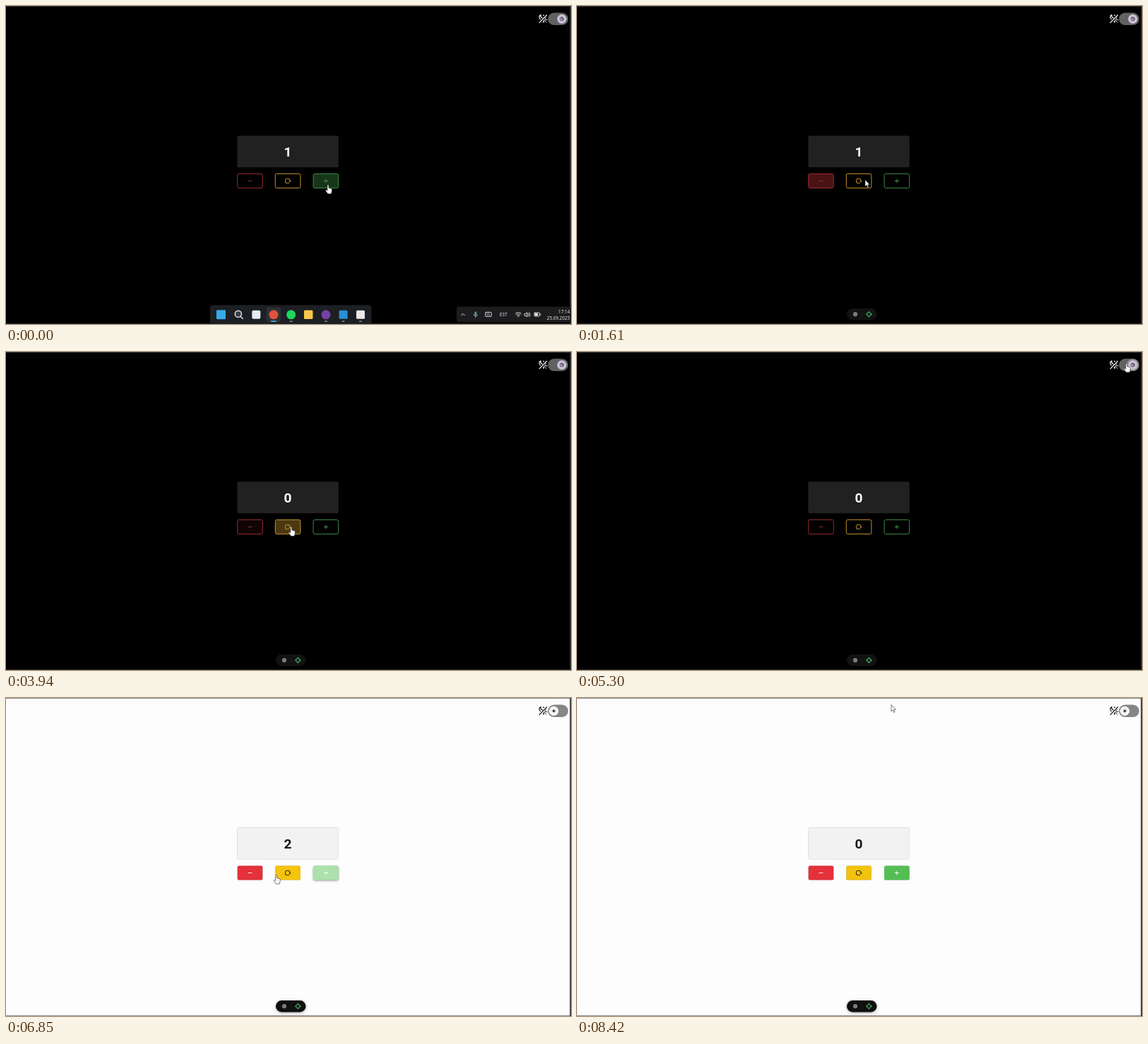
These frames come from a looping animation (800 by 450 pixels, 8.45 s). An HTML page:

```html
<!DOCTYPE html>
<html lang="en">
<head>
<meta charset="utf-8">
<title>Counter</title>
<style>
  html, body { margin: 0; width: 100%; height: 100%; overflow: hidden; background: #000; }
  svg { display: block; width: 800px; height: 450px; }
  #stage {
    --bg: #000; --card: #212121; --ink: #fff; --track: #616161; --thumb: #cdbfda;
    --top: #363636; --side: #303030; --base: #242424; --pill: #121212;
  }
  #stage.light {
    --bg: #fdfdfd; --card: #f2f2f2; --ink: #151515; --track: #868686; --thumb: #fff;
    --top: #8a8a8a; --side: #2b2b2b; --base: #8a8a8a; --pill: #0f0f0f;
  }
  .light #card { filter: drop-shadow(0 .8px .7px rgba(0,0,0,.4)); }
  .light #pill { filter: drop-shadow(0 1px 2px rgba(0,0,0,.35)); }
  #count { font: 700 19.1px Roboto, sans-serif; text-anchor: middle; fill: var(--ink); }
  .tray { font: 6.4px "Open Sans", "Noto Sans", sans-serif; fill: #f2f2f2; }
  .line { fill: none; stroke-linecap: round; stroke-linejoin: round; }
  .face { fill: none; stroke: var(--tint); stroke-width: .9; }
  .icon { fill: var(--tint); }
  .over { fill: var(--tint); }
  .light .face { fill: var(--solid); stroke: none; }
  .light .icon { fill: var(--on); }
  .light .over { fill: var(--on); }
  .sun { display: none; }
  .light .sun { display: inline; }
  .light .moon { display: none; }
</style>
</head>
<body>
<svg id="stage" viewBox="0 0 800 450">
  <rect width="800" height="450" fill="var(--bg)"/>
  <rect width="800" height="1" fill="var(--top)"/>
  <rect y="449" width="800" height="1" fill="var(--base)"/>
  <rect x="798.4" width="1.6" height="450" fill="var(--side)"/>

  <rect id="card" x="327.4" y="183.5" width="143.4" height="44.7" rx="2" fill="var(--card)"/>
  <text id="count" x="399" y="212.6">1</text>
  <g id="buttons"></g>

  <g class="line" stroke="var(--ink)" stroke-width="1.2">
    <path d="M765.6 13L755.2 23.6"/>
    <path d="M757.2 12.6C754.6 13.6 754.2 17 756.6 18.8M757.2 12.6C756.8 15 757.6 16.6 759.6 17M760.6 13.2h1.2"/>
    <path d="M760 22.6L763.6 19M761.4 23.4v-2.6M763.2 21.4l1.8 1.8M763.8 19.6h2.4M763 18l1.6-1.4" stroke-width="1"/>
  </g>
  <rect x="767.3" y="9.5" width="28.7" height="17.6" rx="8.8" fill="var(--track)"/>
  <g id="thumb">
    <circle id="halo" r="8.8" fill="#d9d9d9"/>
    <circle r="6.6" fill="var(--thumb)"/>
    <g class="moon line" stroke="#29222f" stroke-width=".8">
      <circle r="2.5"/><path d="M-1 -1.2L1.2 1.1M-.2 -1.8L1 -.8"/>
    </g>
    <g class="sun">
      <circle r="1.5" fill="#111"/>
      <circle r="2.6" fill="none" stroke="#111" stroke-width=".9" stroke-dasharray=".7 1.342"/>
    </g>
  </g>

  <g id="pill">
    <rect x="382" y="428" width="42.5" height="16.4" rx="8.2" fill="var(--pill)"/>
    <circle cx="394" cy="436.2" r="3.1" fill="#777c80"/>
    <path d="M403.6 432.5v7.4" stroke="#272727" stroke-width=".7"/>
    <g class="line" stroke="#4fcf72" stroke-width=".9">
      <circle cx="413.4" cy="436.2" r="2.9"/>
      <path d="M413.4 432.2v1.8M413.4 438.4v1.8M409.4 436.2h1.8M415.6 436.2h1.8"/>
    </g>
  </g>

  <g id="taskbar">
    <rect x="289" y="423.3" width="228.5" height="30" rx="4" fill="#1c1f23"/>
    <rect x="369" y="426.5" width="20" height="20.5" rx="2" fill="#2d3034"/>
    <g id="apps"></g>
    <g class="line" stroke="#e6e8ea" stroke-width="1.4">
      <circle cx="328.8" cy="435.8" r="4.6" fill="#3a4046"/><path d="M332.3 439.4l3 3.2"/>
    </g>
    <rect x="638" y="425.6" width="166" height="22" rx="4" fill="#1c1c1e"/>
    <g class="line" stroke="#f0f0f0" stroke-width=".9">
      <path d="M644.6 437.8l2.4-2.4 2.4 2.4"/>
      <path d="M662.4 436.4a2.5 2.5 0 0 0 5 0M664.9 439v1.6" stroke="#9fc7c4"/>
      <rect x="663.7" y="432.4" width="2.4" height="5" rx="1.2" fill="#4fb3ac" stroke="none"/>
      <rect x="678.8" y="433.4" width="8.6" height="6" rx="1"/>
      <path d="M680.6 435.4h5M681.2 437.4h3.8" stroke-width=".7" stroke-dasharray=".5 1.2"/>
      <path d="M721.4 435.2a5.8 5.8 0 0 1 8 0M722.8 437a3.8 3.8 0 0 1 5.2 0M724.2 438.6a1.8 1.8 0 0 1 2.4 0M725.4 440h.1"/>
      <path d="M734.4 435.4h1.4l2-1.8v6.4l-2-1.8h-1.4zM739.4 435.2a2.4 2.4 0 0 1 0 3.2M740.8 433.8a4.2 4.2 0 0 1 0 6"/>
      <rect x="748" y="434" width="7.6" height="5" rx="1"/>
      <path d="M749.4 435.2h3.4v2.6h-3.4z" fill="#f0f0f0"/><path d="M756.8 436v1"/>
    </g>
    <text class="tray" x="704.4" y="439" text-anchor="middle">EST</text>
    <text class="tray" x="798.4" y="434.8" text-anchor="end">17:14</text>
    <text class="tray" x="798.4" y="443.6" text-anchor="end">25.09.2025</text>
  </g>

  <g id="cursor" fill="#fff" stroke="#222" stroke-width=".6" stroke-linejoin="round">
    <path id="arrow" d="M0 0V9.4L2.1 7.4L3.6 10.9L5.1 10.2L3.6 6.9H6.5Z"/>
    <path id="hand" d="M-1 1a1 1 0 0 1 2 0V4.5l3.5.9c.9.2 1.2.9 1.1 1.7L5.1 10.6L4.5 12.8H-.4L-3.3 8.5c-.6-1 .6-1.9 1.4-1.1L-1 8.3Z"/>
  </g>
</svg>

<script>
const LOOP = 8450, THEME_AT = 5390, LAG = 70, RELEASE = 90;
const $ = id => document.getElementById(id);

function add(parent, tag, attrs) {
  const el = document.createElementNS('http://www.w3.org/2000/svg', tag);
  for (const k in attrs) el.setAttribute(k, attrs[k]);
  return parent.appendChild(el);
}
const clamp = v => Math.max(0, Math.min(1, v));
const smooth = p => p * p * (3 - 2 * p);

const buttons = {
  minus: { x: 345.5, tint: '#ad2f37', solid: '#e4313a', on: '#fff', icon: 'M19 13H5v-2h14z' },
  reset: { x: 399.1, tint: '#d9a334', solid: '#f5c40e', on: '#111',
    icon: 'M2 12a9 9 0 009 9c2.4 0 4.7-.9 6.4-2.6l-1.5-1.5A6.7 6.7 0 0111 19c-6.2 0-9.4-7.5-5-12S18 5.8 18 12h-3l4 4h.1l3.9-4h-3a9 9 0 00-18 0z' },
  plus: { x: 452.9, tint: '#459a4a', solid: '#54be54', on: '#fff', icon: 'M19 13h-6v6h-2v-6H5v-2h6V5h2v6h6z' }
};

// time, button, x, y
const clicks = [
  [-200, 'plus', 456, 253], [260, 'plus', 456, 253], [520, 'plus', 456, 253],
  [1180, 'minus', 346, 249], [1420, 'minus', 346, 249],
  [1800, 'reset', 403, 248], [2400, 'plus', 452, 249], [2865, 'reset', 403.5, 247],
  [3250, 'minus', 346, 250], [3480, 'minus', 346, 250], [3800, 'reset', 401, 249],
  [6400, 'plus', 455, 250], [6610, 'plus', 455, 250], [6960, 'minus', 346, 250],
  [7400, 'plus', 443.5, 242.5], [7880, 'reset', 402, 250]
].map(([t, name, x, y]) => ({ t, name, x, y }));

// time, x, y of the pointer tip
const path = [
  [0, 456, 253], [700, 456, 253], [1100, 346, 249], [1480, 346, 249],
  [1610, 408, 246], [1750, 403, 248], [1950, 403, 248], [2250, 452, 249], [2500, 452, 249],
  [2780, 403.5, 246], [2960, 403.5, 246], [3180, 346, 250], [3540, 346, 250],
  [3740, 401, 249], [3920, 401, 249], [4270, 671, 112], [4900, 778, 16], [5450, 778, 16],
  [6000, 426, 258], [6180, 426, 258], [6340, 455, 250], [6650, 455, 250], [6740, 478, 251],
  [6910, 346, 250], [7040, 346, 250], [7300, 444, 241], [7620, 444, 241],
  [7800, 402, 250], [7980, 402, 250], [8400, 445, 9.5]
];

for (const name in buttons) {
  const b = buttons[name];
  const box = { x: b.x - 17.8, y: 237.4, width: 35.6, height: 20.2, rx: 2.2 };
  const g = add($('buttons'), 'g', { style: `--tint:${b.tint};--solid:${b.solid};--on:${b.on}` });
  add(add(g, 'clipPath', { id: 'clip-' + name }), 'rect', box);
  b.face = add(g, 'rect', { ...box, class: 'face' });
  b.over = add(g, 'rect', { ...box, class: 'over' });
  const layer = add(g, 'g', { 'clip-path': `url(#clip-${name})` });
  for (const c of clicks) if (c.name === name) c.el = add(layer, 'circle', { cx: c.x, cy: c.y, class: 'over' });
  add(g, 'path', { d: b.icon, class: 'icon', transform: `translate(${b.x - 5.06} 242.4) scale(.422)` });
}

// centre, size, corner radius, colour, running mark width
[
  [304.5, 13, 1, '#39a9ea', 0], [354.3, 12, 2, '#e4edf2', 0], [379, 13, 6.5, '#e2513f', 8],
  [403.6, 13, 6.5, '#1ed760', 4], [428.2, 12.5, 1.5, '#f6c748', 0], [453, 13, 6.5, '#7440a6', 4],
  [477.6, 12, 1.5, '#2b8fd6', 4], [502, 12, 1.5, '#ece8e8', 4]
].forEach(([x, s, rx, fill, mark]) => {
  add($('apps'), 'rect', { x: x - s / 2, y: 436.8 - s / 2, width: s, height: s, rx, fill });
  if (mark) add($('apps'), 'rect', { x: x - mark / 2, y: 445.6, width: mark, height: 1.4, rx: .7, fill: mark > 4 ? '#4cc2ff' : '#8d9296' });
});

function pointer(t) {
  const i = path.findIndex(k => k[0] > t);
  if (i === 0) return path[0].slice(1);
  if (i < 0) return path[path.length - 1].slice(1);
  const [t0, x0, y0] = path[i - 1], [t1, x1, y1] = path[i];
  const p = smooth((t - t0) / (t1 - t0));
  return [x0 + (x1 - x0) * p, y0 + (y1 - y0) * p];
}

function hovered(t) {
  const [x, y] = pointer(t - LAG);
  if (x > 767 && y > 9 && y < 28) return 'toggle';
  if (y < 237 || y > 258) return '';
  return Object.keys(buttons).find(n => Math.abs(buttons[n].x - x) < 18) || '';
}

// share of the last 200 ms spent over a control
function hoverLevel(t, name) {
  let n = 0;
  for (let i = 0; i < 8; i++) n += hovered(t - i * 25) === name;
  return n / 8;
}

function countAt(t) {
  let n = 0;
  for (const c of clicks) {
    if (t < c.t + RELEASE) break;
    n = c.name === 'reset' ? 0 : n + (c.name === 'plus' ? 1 : -1);
  }
  return n;
}

function render(t) {
  const light = t >= THEME_AT;
  $('stage').classList.toggle('light', light);
  $('count').textContent = countAt(t);

  for (const name in buttons) {
    const { face, over } = buttons[name], level = hoverLevel(t, name);
    over.setAttribute('opacity', level * (light ? .2 : .1));
    face.style.filter = light
      ? `drop-shadow(0 ${.7 + level * .8}px ${.6 + level}px rgba(0,0,0,.4))` : 'none';
  }
  for (const c of clicks) {
    const dt = t - c.t, p = clamp(dt / 350);
    const fade = dt < 0 ? 0 : 1 - clamp((dt - 300) / 250);
    c.el.setAttribute('r', 32 * (1 - (1 - p) ** 2));
    c.el.setAttribute('opacity', fade * (light ? .34 : .27));
  }

  const slide = smooth(clamp((t - THEME_AT) / 180));
  $('thumb').setAttribute('transform', `translate(${787 - 11.4 * slide} 18.3)`);
  const press = t < 5270 ? 0 : 1 - clamp((t - 5420) / 200);
  $('halo').setAttribute('opacity', hoverLevel(t, 'toggle') * .12 + press * .25);

  $('taskbar').setAttribute('transform', `translate(0 ${28 * smooth(clamp((t - 300) / 180))})`);

  const [x, y] = pointer(t), hand = hovered(t) !== '';
  $('cursor').setAttribute('transform', `translate(${x} ${y})`);
  $('hand').style.display = hand ? 'inline' : 'none';
  $('arrow').style.display = hand ? 'none' : 'inline';
}

const start = performance.now();
function tick() {
  render((performance.now() - start) % LOOP);
  requestAnimationFrame(tick);
}
tick();
</script>
</body>
</html>
```
